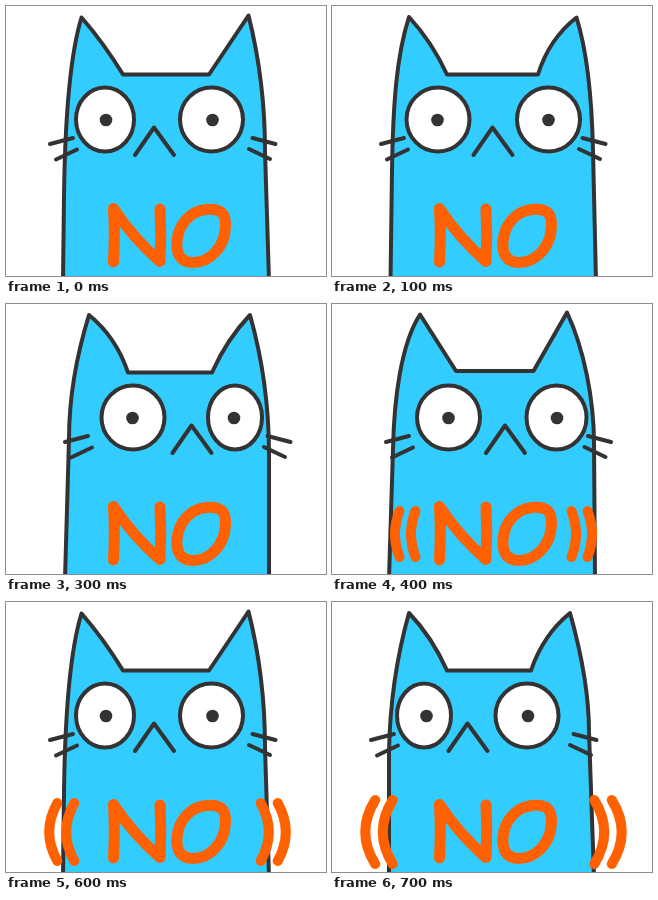
An HTML page for the animation above (0.8 s loop, 320x270 px).

```html
<!DOCTYPE html>
<html lang="en">
<head>
<meta charset="utf-8">
<title>Cat says no</title>
<style>
  html, body { margin: 0; width: 100%; height: 100%; overflow: hidden; background: #fff; }
  svg { display: block; width: 100vw; height: 100vh; }
  .ink { fill: none; stroke: #333; stroke-width: 4; stroke-linecap: round; stroke-linejoin: round; }
  .loud { fill: none; stroke: #ff6000; stroke-width: 11; stroke-linecap: round; stroke-linejoin: round; }
  #head { fill: #3cf; }
  .eye { fill: #fff; }
  .pupil { fill: #333; }
</style>
</head>
<body>
<svg viewBox="0 0 320 270">
  <path id="head" class="ink"/>
  <ellipse class="ink eye" cy="113.5" ry="32"/>
  <ellipse class="ink eye" cy="113.5" ry="32"/>
  <circle class="pupil" cy="114" r="6.3"/>
  <circle class="pupil" cy="114" r="6.3"/>
  <path id="face" class="ink"/>
  <g class="loud">
    <path d="M107.5 256Q109 228 107.5 202.5Q127 232 154 255.5Q155.5 229 154 203"/>
    <path d="M200 203.5C213 202 220 206 219.5 220C219 242 203 256.5 187 256.5C174 256.5 170 247 171 236C172 219 184 205 200 203.5Z"/>
    <path id="waves" stroke-width="10"/>
  </g>
</svg>
<script>
const $ = s => document.querySelector(s);
const eyes = document.querySelectorAll('.eye');
const pupils = document.querySelectorAll('.pupil');

// Head turns from left (0) to right (4); eyes are [cx, rx, pupil x]
const poses = [
  { head: 'M57 275V150C58 95 66 50 77 11Q100 35 115 68.5H199Q211 33 238 11C249 50 257 95 257 130L262 275',
    eyes: [[92, 27, 94.5], [195, 31.5, 196]], nose: 135.5, whiskers: [-5, -5] },
  { head: 'M57 275L58 190C59 115 63 52 75.5 11.5Q97 36 117 68.5H203L242.5 9.5C254 55 259 105 259 145L263 275',
    eyes: [[99, 29, 100], [205.5, 31.5, 206.5]], nose: 148, whiskers: [0, 0] },
  { head: 'M58.5 275L60 165C61 95 65 48 77 11Q100 36 115 68.5H206Q217 33 244.5 11.5C255 45 260 97 261 145L264 275',
    eyes: [[106, 31.5, 105.5], [216.5, 31.5, 216.5]], nose: 160.5, whiskers: [5, 4] },
  { head: 'M57 275L61 145C62 95 69 40 88 10.5L124 67H201.5L235 8.5C252 45 262 95 262 140L263 275',
    eyes: [[116.5, 31.5, 116.5], [224.5, 30, 225]], nose: 173, whiskers: [10, 9.5] },
  { head: 'M59 275L63 135C63 95 71 50 83 11Q110 33 122 68.5H206Q221 35 244 11C255 50 263 95 263 150V275',
    eyes: [[127, 31.5, 126.5], [229, 27, 228]], nose: 185.5, whiskers: [15, 15] }
];
const order = [1, 2, 3, 4, 3, 2, 1, 0];

// Two mirrored pairs of arcs that grow and move outward with k
function wavePath(k) {
  const h = 23 + 3 * k, bulge = 4.5 + 1.8 * k;
  let d = '';
  for (const reach of [82.5 + 9.4 * k, 98.5 + 9.9 * k])
    for (const side of [-1, 1])
      d += `M${161.5 + side * (reach - bulge)} ${230 - h}q${side * bulge * 2} ${h} 0 ${2 * h}`;
  return d;
}

function show(step) {
  const { head, eyes: look, nose, whiskers: [l, r] } = poses[order[step]];
  $('#head').setAttribute('d', head);
  look.forEach(([cx, rx, px], i) => {
    eyes[i].setAttribute('cx', cx);
    eyes[i].setAttribute('rx', rx);
    pupils[i].setAttribute('cx', px);
  });
  $('#face').setAttribute('d',
    `M${nose - 19} 149l19-27.5 20 27.5` +
    `M${44 + l} 138l23-6M${50 + l} 153.5l21-10` +
    `M${246.5 + r} 132l23 6M${243 + r} 143l21 10`);
  $('#waves').setAttribute('d', step < 4 ? '' : wavePath(step - 4));
}

function tick() {
  show(Math.floor(performance.now() / 100) % 8);
  requestAnimationFrame(tick);
}
tick();
</script>
</body>
</html>
```
